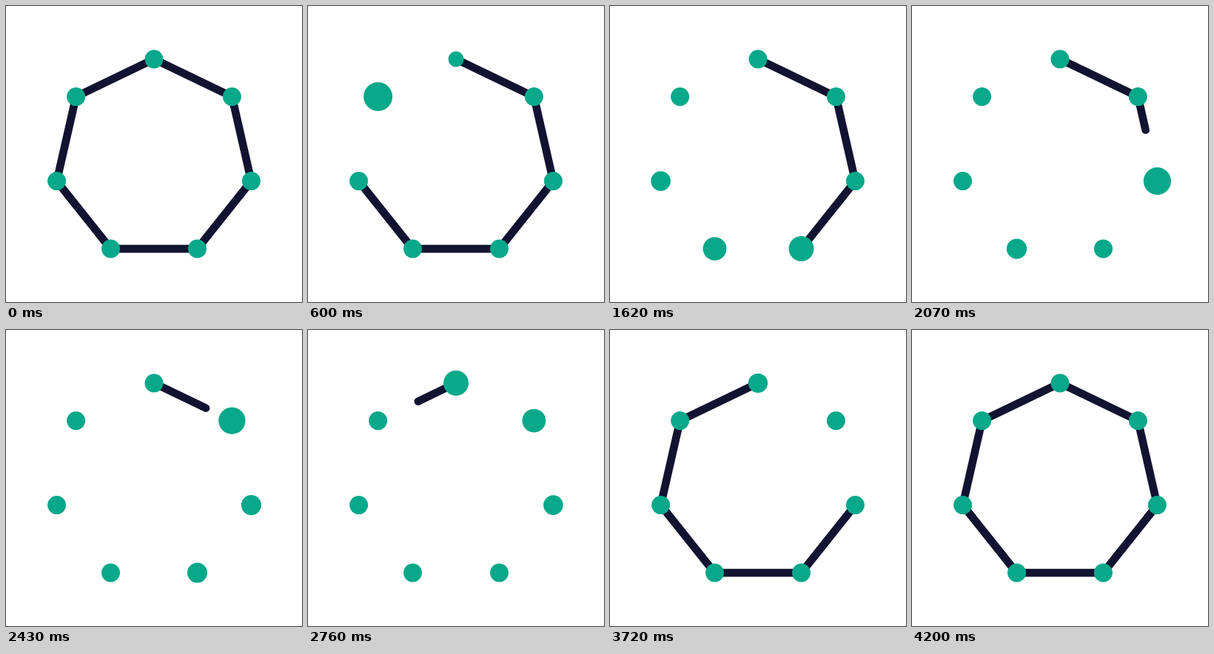
Write an HTML page that moves like this. It is 400 px wide and 400 px high and loops after 4230 ms.

```html
<!DOCTYPE html>
<html lang="en">
<head>
<meta charset="utf-8">
<title>Heptagon loop</title>
<style>
  html, body { margin: 0; width: 100%; height: 100%; overflow: hidden; background: #fff; }
  svg { display: block; width: 100vw; height: 100vh; }
  path { fill: none; stroke: #121331; stroke-width: 10.7; stroke-linecap: round; stroke-linejoin: round; }
  circle { fill: #08a88a; }
</style>
</head>
<body>
<svg viewBox="0 0 400 400"><path id="line" pathLength="7"/></svg>
<script>
  const LOOP = 4230, TICK = 30, SIDES = 7;
  const ERASE_STEP = 380, ERASE_TIME = 325;
  const DRAW_START = 2652, DRAW_STEP = 220;
  const CENTER_X = 200, CENTER_Y = 206.6, RADIUS = 134.8;
  const REST = 12.5;

  // Radius of a dot over the time (ms) since its pulse began
  const PULSE = [
    [0, REST], [50, 15], [100, 17], [170, 18.6], [220, 19.5], [290, 19.8],
    [340, 19.5], [380, 18.8], [430, 17.6], [480, 15.9], [550, 12.6],
    [600, 10.5], [630, 10.2], [680, 10.9], [760, 12.5], [860, 13.3],
    [940, 13.7], [1000, 13.5], [1100, 12.9], [1230, REST]
  ];

  const svg = document.querySelector("svg");
  const line = document.getElementById("line");
  const clamp = x => Math.min(1, Math.max(0, x));
  const easeSine = x => (1 - Math.cos(Math.PI * x)) / 2;
  const easeSteep = x => x < 0.5 ? 16 * x ** 5 : 1 - 16 * (1 - x) ** 5;

  // Corners run counter-clockwise from the top
  const corners = Array.from({ length: SIDES }, (_, i) => {
    const a = i * 2 * Math.PI / SIDES;
    return [CENTER_X - RADIUS * Math.sin(a), CENTER_Y - RADIUS * Math.cos(a)];
  });
  line.setAttribute("d", "M" + corners.map(p => p.join(" ")).join("L") + "Z");

  const dots = corners.map(([x, y]) => {
    const dot = document.createElementNS("http://www.w3.org/2000/svg", "circle");
    dot.setAttribute("cx", x);
    dot.setAttribute("cy", y);
    return svg.appendChild(dot);
  });

  function pulse(t) {
    const i = PULSE.findIndex(p => p[0] > t);
    if (i < 1) return REST;
    const [t0, r0] = PULSE[i - 1], [t1, r1] = PULSE[i];
    return r0 + (r1 - r0) * (t - t0) / (t1 - t0);
  }

  // Number of sides passed, each side eased on its own
  function travel(t, step, time, ease) {
    const side = Math.floor(t / step);
    if (side >= SIDES) return SIDES;
    return side + ease(clamp((t - side * step) / time));
  }

  function render(t) {
    const drawing = t >= DRAW_START;
    const from = drawing ? 0 : travel(t, ERASE_STEP, ERASE_TIME, easeSteep);
    const to = drawing ? travel(t - DRAW_START, DRAW_STEP, DRAW_STEP, easeSine) : SIDES;
    const length = to - from;
    line.style.visibility = length > 0.001 ? "visible" : "hidden";
    line.style.strokeDasharray = length >= SIDES ? "none" : `${length} 8`;
    line.style.strokeDashoffset = -from;

    dots.forEach((dot, i) => {
      let age = t - i * ERASE_STEP;
      if (i === 0 && t >= SIDES * ERASE_STEP) age = t - SIDES * ERASE_STEP;
      dot.setAttribute("r", pulse(age));
    });
  }

  const start = performance.now();
  function frame() {
    const t = (performance.now() - start) % LOOP;
    render(Math.floor(t / TICK) * TICK);
    requestAnimationFrame(frame);
  }
  frame();
</script>
</body>
</html>
```
